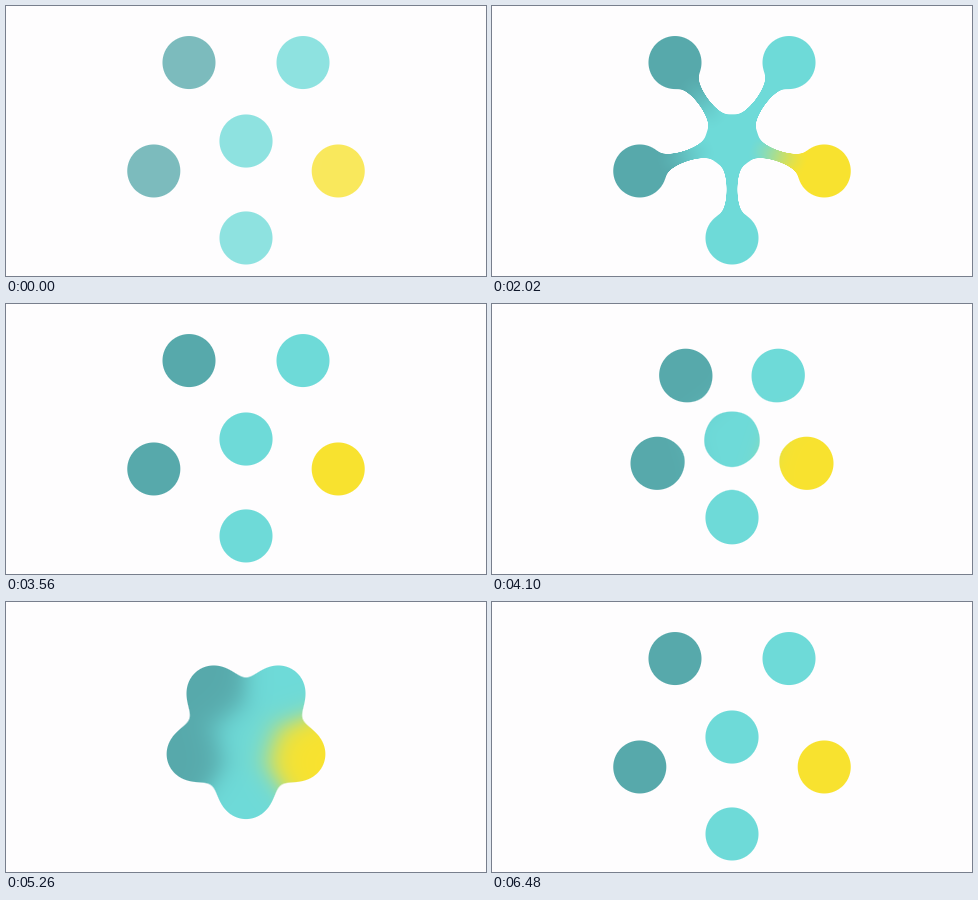
These frames come from a looping animation (480 px wide and 270 px high, 6.6 s). An HTML page with a canvas:

```html
<!DOCTYPE html>
<html lang="en">
<head>
<meta charset="utf-8">
<title>Merging dots</title>
<style>
  html, body { margin: 0; width: 100%; height: 100%; overflow: hidden; background: #fefdfe; }
  canvas { display: block; width: 480px; height: 270px; }
</style>
</head>
<body>
<canvas id="stage" width="480" height="270"></canvas>
<script>
const LOOP = 6600, MOVE = 1200;
const CX = 240, CY = 135;
const FAR = 97, NEAR = 55.5;          // distance of the outer dots from the centre
const SPREAD = 800;                   // 2 * sigma^2 of a dot's field
const LEVEL = Math.exp(-26.5 * 26.5 / SPREAD);
const ARM_SPREAD = 40.5, ARM_PEAK = 0.65;
const BOX = { x: 118, y: 27, w: 244, h: 236 };
const BACK = [254, 253, 254];
const CYAN = [110, 218, 216], TEAL = [87, 169, 171], YELLOW = [248, 226, 47];
const OUTER = [CYAN, TEAL, TEAL, CYAN, YELLOW];   // clockwise from the bottom

const ctx = document.getElementById('stage').getContext('2d');
const image = ctx.createImageData(BOX.w, BOX.h);

const clamp = v => Math.max(0, Math.min(1, v));

function ease(time, start) {
  const p = clamp((time - start) / MOVE);
  return p < 0.5 ? 2 * p * p : 1 - 2 * (1 - p) * (1 - p);
}

function draw(time) {
  const arms = ARM_PEAK * (ease(time, 520) - ease(time, 1990));
  const distance = FAR + (NEAR - FAR) * (ease(time, 3540) - ease(time, 5230));
  const opacity = 0.78 + 0.22 * clamp(time / 380);

  const dots = OUTER.map((color, i) => {
    const angle = Math.PI * (0.5 + 0.4 * i);
    const ux = Math.cos(angle), uy = Math.sin(angle);
    return { color, ux, uy, x: ux * distance, y: uy * distance };
  });
  dots.push({ color: CYAN, x: 0, y: 0 });

  const data = image.data;
  let at = 0;
  for (let row = 0; row < BOX.h; row++) {
    const y = BOX.y + row + 0.5 - CY;
    for (let col = 0; col < BOX.w; col++, at += 4) {
      const x = BOX.x + col + 0.5 - CX;
      let field = 0, r = 0, g = 0, b = 0;

      for (const dot of dots) {
        const dx = x - dot.x, dy = y - dot.y;
        const f = Math.exp(-(dx * dx + dy * dy) / SPREAD);
        field += f;
        r += f * dot.color[0];
        g += f * dot.color[1];
        b += f * dot.color[2];

        if (!arms || dot.ux === undefined) continue;
        const along = x * dot.ux + y * dot.uy;
        const across = x * dot.uy - y * dot.ux;
        if (along < 0 || along > distance || Math.abs(across) > 22) continue;
        const a = arms * Math.exp(-across * across / ARM_SPREAD);
        const mix = clamp((along / distance - 0.2) / 0.6);
        field += a;
        r += a * (CYAN[0] + (dot.color[0] - CYAN[0]) * mix);
        g += a * (CYAN[1] + (dot.color[1] - CYAN[1]) * mix);
        b += a * (CYAN[2] + (dot.color[2] - CYAN[2]) * mix);
      }

      const alpha = opacity * clamp((field - LEVEL) / 0.028 + 0.5);
      data[at] = BACK[0] + (r / field - BACK[0]) * alpha;
      data[at + 1] = BACK[1] + (g / field - BACK[1]) * alpha;
      data[at + 2] = BACK[2] + (b / field - BACK[2]) * alpha;
      data[at + 3] = 255;
    }
  }
  ctx.putImageData(image, BOX.x, BOX.y);
}

const start = performance.now();
function tick() {
  draw((performance.now() - start) % LOOP);
  requestAnimationFrame(tick);
}
tick();
</script>
</body>
</html>
```
